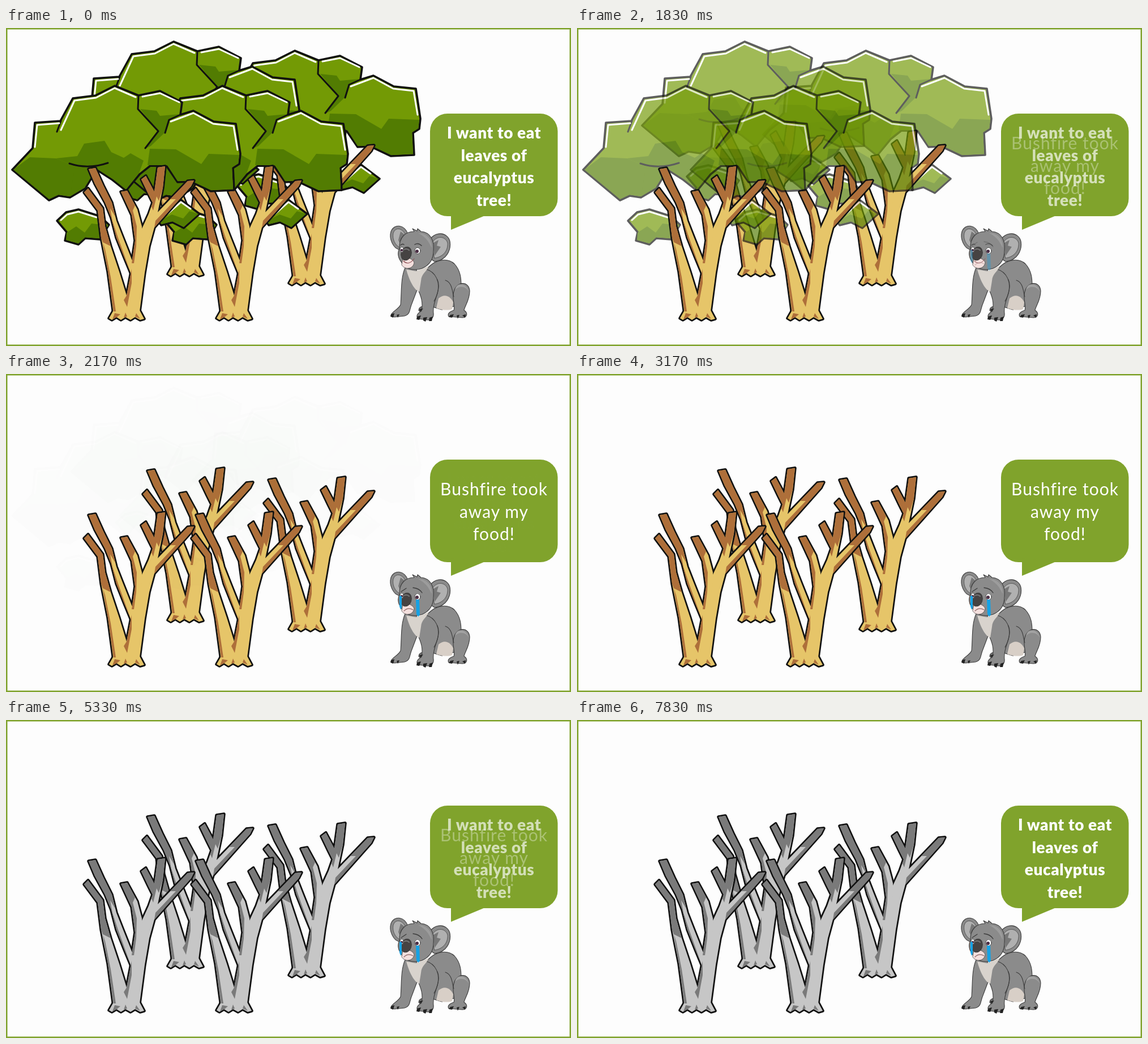
These frames come from a looping animation (998 px wide and 561 px high, 7910 ms). An HTML page:

```html
<!DOCTYPE html>
<html lang="en">
<head>
<meta charset="utf-8">
<title>Koala and the bushfire</title>
<style>
  html, body { margin: 0; width: 100%; height: 100%; overflow: hidden; background: #fdfdfd; }
  svg { display: block; width: 998px; height: 561px; }
  .leaf { opacity: var(--leaf); }
  .before { opacity: var(--before); }
  .after { opacity: var(--after); }
  .wish { opacity: var(--wish); font: 900 28px Lato, sans-serif; letter-spacing: .6px; }
  .loss { opacity: var(--loss); font: 400 30px Lato, sans-serif; letter-spacing: 1px; }
  text { fill: #fff; text-anchor: middle; }
</style>
</head>
<body>
<svg viewBox="0 0 998 561">
  <defs>
    <g id="wood" stroke-linejoin="round">
      <path d="M138 290L145 283 171 318 175 350 185 385 200 430 213 472 213 505 190 505 180 430 168 370 162 322Z"/>
      <path d="M146 249L158 247 172 278 187 308 195 340 206 368 222 408 232 425 221 434 209 405 195 370 186 335 175 308 157 275Z"/>
      <path d="M203 289L214 287 232 320 240 350 242 390 234 425 222 415 228 375 222 330Z"/>
      <path d="M213 472L222 425 235 400 240 368 240 354 252 328 259 308 251 292 239 267 247 261 262 289 268 246 281 244 277 282 268 325 321 270 332 269 327 279 262 352 253 385 245 432 236 500 213 505Z"/>
      <path d="M190 498L236 498 244 513 237 515 228 510 220 515 211 510 203 515 195 510 187 515 182 512Z"/>
    </g>

    <g id="trunk">
      <use href="#wood" fill="#111" stroke="#111" stroke-width="5.500"/>
      <use href="#wood" fill="var(--tan)"/>
      <g fill="var(--bark)">
        <path d="M138 290L145 283 171 318 175 350 185 385 171 378 168 370 162 322Z"/>
        <path d="M171 378L175 390 185 440 194 500 190 500 180 430Z"/>
        <path d="M146 249L158 247 172 278 187 308 193 333 184 318 188 340 198 370 221 434 209 405 195 370 186 335 175 308 157 275Z"/>
        <path d="M203 289L214 287 228 313 224 322 231 350 230 385 226 415 222 415 228 375 222 330Z"/>
        <path d="M251 292L239 267 247 261 262 289 268 246 281 244 277 282 270 305 266 297 260 322 257 315 259 308Z"/>
        <path d="M290 302L321 270 332 269 327 279 262 352 264 340 300 302Z"/>
        <path d="M213 472L222 425 222 450 214 492 208 480Z"/>
        <path d="M192 503L202 505 196 510 188 514Z M211 502L214 509 208 511Z M230 503L237 513 228 509Z"/>
      </g>
    </g>

    <g id="crown" stroke-linejoin="round" stroke-linecap="round">
      <g stroke="#111" stroke-width="3.500" fill="var(--green)">
        <path d="M90 340L106 325 128 320 166 332 182 347 166 373 140 371 128 382 104 375 107 360Z"/>
        <path d="M268 340L284 324 309 303 342 328 314 353 294 343 274 348Z"/>
      </g>
      <g fill="var(--shade)">
        <path d="M107 361L124 350 139 361 151 345 181 348 165 371 140 369 128 380 106 374Z"/>
        <path d="M272 340L293 329 313 336 324 323 340 328 314 351 294 341 275 346Z"/>
      </g>
      <path d="M11 250L47 212 51 167 96 164 118 124 158 119 192 102 234 119 272 111 311 131 308 153 331 146 367 165 406 169 414 222 412 240 401 247 403 286 362 288 326 271 303 272 284 244 255 243 236 258 212 287 188 268 160 250 140 283 113 299 93 296 76 304Z" fill="var(--green)" stroke="#111" stroke-width="3.600"/>
      <g fill="var(--shade)">
        <path d="M13 250L42 228 88 230 122 244 140 281 113 297 93 294 76 302Z"/>
        <path d="M88 230L126 226 138 204 174 199 186 219 208 229 220 221 243 234 235 256 212 285 188 266 160 248 139 281 113 297 122 244Z"/>
        <path d="M237 143L266 146 272 155 306 152 288 162 281 184 256 208 247 212 269 182Z"/>
        <path d="M254 213L300 214 345 240 358 222 412 224 410 239 399 246 401 284 362 286 326 269 303 270 285 242 250 242Z"/>
      </g>
      <g fill="none" stroke="#111" stroke-width="3">
        <path d="M90 183L97 164M234 119L233 143 269 182 246 212M308 153L288 162 281 185M112 239Q145 250 180 238"/>
      </g>
      <g fill="none" stroke="#fdfdfd" stroke-width="3">
        <path d="M51 210L55 171 94 168M97 180L121 128 159 123 192 106 229 122M241 121L272 115 306 131M291 165L331 150 366 169 402 173 409 215M97 339L108 329 128 324 160 334M285 328L309 307 326 319"/>
      </g>
    </g>
  </defs>

  <rect width="998" height="561" fill="#fdfdfd"/>
  <g id="forest"></g>

  <g fill="#80a32c">
    <rect x="749" y="151" width="225.500" height="181" rx="31"/>
    <path d="M786 325V356L846 331Z"/>
  </g>
  <g class="wish" id="wish"></g>
  <g class="loss" id="loss"></g>

  <g id="koala" stroke="#3c3c3c" stroke-width="1.100" stroke-linejoin="round" stroke-linecap="round" fill="#8b8b8b">
    <path d="M729 498C729 490 742 489 746 493L745 500 731 500Z" fill="#777"/>
    <path d="M742 427C757 407 780 405 792 416C803 428 804 442 804 455L795 490 770 497 747 490Z"/>
    <path d="M764 477C775 467 786 474 790 484L788 496C779 499 769 497 760 494Z" fill="#d8cfc7" stroke="none"/>
    <path d="M791 465C796 446 818 446 819 464C819 480 811 489 809 498C817 503 814 511 806 511L782 509C779 504 784 500 791 498C794 489 787 477 791 465Z"/>
    <path d="M793 462C800 454 813 455 818 466C813 449 796 447 793 462Z" fill="#a2a2a2" stroke="none"/>
    <path d="M705 423C697 441 699 464 697 488C693 497 681 500 680 507L686 510 704 508C715 505 712 497 717 486L728 457 725 424Z"/>
    <path d="M740 425C761 430 767 450 762 468C757 483 754 493 755 503C756 511 751 515 744 515L728 513C723 507 728 503 734 499C737 484 733 473 728 462C725 443 730 430 740 425Z"/>
    <path d="M707 426L724 429 747 420C742 431 734 433 733 446L730 465C722 463 713 448 707 426Z" fill="#d8d3cd" stroke="none"/>
    <path d="M762 444C767 455 762 472 756 482M776 445C789 449 788 467 791 474" fill="none"/>
    <g fill="#222" stroke="none">
      <path d="M680 505L686 503 684 511 679 509ZM690 506L695 505 692 511ZM726 509L733 507 730 515 725 514ZM737 511L744 510 741 518 737 516ZM748 511L754 509 752 517 747 517ZM785 506L791 505 788 511 782 510ZM796 507L801 506 798 513ZM806 507L812 505 811 511ZM730 496L737 495 732 500Z"/>
    </g>

    <path d="M710 364C705 347 686 344 680 359C676 372 684 389 695 391Z"/>
    <path d="M706 366C701 353 688 350 684 362C682 374 688 383 695 387Z" fill="#b0b0b0" stroke-width=".7"/>
    <path d="M697 359L706 366 697 384 693 374Z" fill="#777" stroke="none"/>
    <path d="M747 376C757 357 780 360 784 376C787 393 777 410 757 412L747 405Z"/>
    <path d="M752 380C760 365 776 367 780 379C781 393 772 404 757 406Z" fill="#b0b0b0" stroke-width=".7"/>
    <path d="M753 380L764 374 761 384 768 386 757 402Z" fill="#777" stroke="none"/>
    <path d="M695 389C694 369 706 359 721 359L718 354 726 358 727 354 733 359C750 360 757 376 755 393C755 410 747 419 735 424C721 429 703 425 699 414C692 405 691 397 695 389Z"/>
    <path d="M728 362C744 361 753 374 752 388C746 376 741 368 728 362Z" fill="#9c9c9c" stroke="none"/>
    <path d="M701 407C708 403 719 407 721 414C719 426 704 427 699 418Z" fill="#f3dfdd" stroke-width=".7"/>
    <ellipse cx="707" cy="398" rx="9" ry="12" transform="rotate(16 707 398)" fill="#464343"/>
    <path d="M703 391Q708 388 712 392" stroke="#777" stroke-width="2" fill="none"/>

    <g fill="#fff" stroke-width=".9">
      <ellipse cx="699" cy="391" rx="3" ry="4.500"/>
      <ellipse cx="727" cy="393" rx="5" ry="5.500"/>
    </g>
    <g fill="#4b2f45" stroke="none">
      <circle cx="699" cy="392" r="2.200"/>
      <circle cx="726" cy="394" r="3"/>
    </g>
    <g class="before" fill="none">
      <path d="M697 383Q700 380 703 382M722 382Q728 378 734 384" stroke-width="1.500"/>
      <path d="M702 411Q711 420 721 407" stroke="#8a4b50"/>
    </g>
    <g class="after">
      <path d="M721 390Q727 385 733 391V388Q727 384 721 387Z" stroke="none"/>
      <path d="M698 384L707 378M719 377Q730 378 735 386" fill="none" stroke-width="1.300"/>
      <path d="M703 418Q710 411 719 416" fill="none" stroke="#8a6262"/>
      <path d="M695 391L699 392 699 412 697 416 695 410ZM724 398L730 398 731 425 728 428 725 424Z" fill="#16a2e5" stroke="none"/>
    </g>
  </g>

  <rect x="1.250" y="1.250" width="995.500" height="558.500" fill="none" stroke="#80a32c" stroke-width="2.500"/>
</svg>

<script>
  const LOOP = 7910, STEP = LOOP / 95, FADE = 500;
  const root = document.documentElement.style;
  const byId = id => document.getElementById(id);

  // Back to front
  const trees = [[318, -62], [104, -78], [190, 0], [0, 0]];
  byId('forest').innerHTML = trees.map(([x, y]) =>
    `<g transform="translate(${x} ${y})"><use href="#crown" class="leaf"/><use href="#trunk"/></g>`).join('');

  const lines = (id, top, rows) => {
    byId(id).innerHTML = rows.map((row, i) => `<text x="862" y="${top + i * 39.7}">${row}</text>`).join('');
  };
  lines('wish', 195, ['I want to eat', 'leaves of', 'eucalyptus', 'tree!']);
  lines('loss', 214, ['Bushfire took', 'away my', 'food!']);

  const fade = (t, start) => Math.min(1, Math.max(0, (t - start) / FADE));
  const mix = (a, b, k) => `rgb(${a.map((v, i) => Math.round(v + (b[i] - v) * k))})`;
  const set = (name, value) => root.setProperty('--' + name, value);

  set('green', '#739a05');
  set('shade', '#527c02');

  function draw(now) {
    const t = Math.floor((now % LOOP + 5) / STEP) * STEP;
    const burn = fade(t, 1667), ash = fade(t, 4580), again = fade(t, 5000);
    set('leaf', 1 - burn);
    set('before', 1 - burn);
    set('after', burn);
    set('wish', Math.max(1 - burn, again));
    set('loss', Math.min(burn, 1 - again));
    set('tan', mix([230, 197, 105], [198, 198, 198], ash));
    set('bark', mix([174, 111, 58], [122, 122, 122], ash));
  }

  const begin = performance.now();
  const tick = () => {
    draw(performance.now() - begin);
    requestAnimationFrame(tick);
  };
  tick();
</script>
</body>
</html>
```
